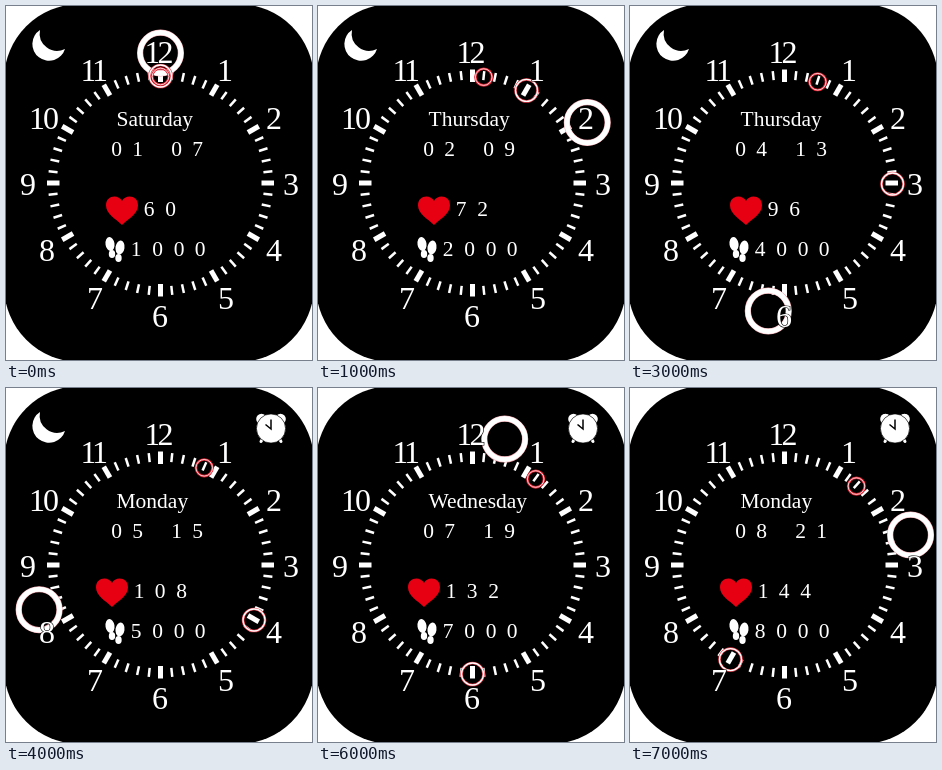
An HTML page for the animation above (8 s loop, 306 by 354 pixels).

```html
<!DOCTYPE html>
<html lang="en">
<head>
<meta charset="utf-8">
<title>Watch face</title>
<style>
html, body { margin: 0; width: 100%; height: 100%; overflow: hidden; background: #fff; }
svg { display: block; width: 306px; height: 354px; }
text { font-family: "Liberation Serif", serif; fill: #fff; }
#dial text { font-size: 32px; text-anchor: middle; stroke: #000; stroke-width: 1.2px; paint-order: stroke; }
.digits { font-size: 21.5px; text-anchor: middle; }
#day { font-size: 21.5px; }
circle.ring { fill: none; }
</style>
</head>
<body>
<svg viewBox="0 0 306 354" xmlns="http://www.w3.org/2000/svg">
  <rect x="-2" y="-2" width="310" height="358" rx="76"/>
  <path id="moon" fill="#fff" d="M34 24A16.7 16.7 0 1 0 59 43A17.5 17.5 0 0 1 34 24Z"/>
  <g id="alarm" fill="#fff">
    <path d="M256.500 51l-1.500 2.500M273.500 51l1.500 2.500" stroke="#fff" stroke-width="3" stroke-linecap="round"/>
    <circle cx="255.500" cy="31" r="5.3"/>
    <circle cx="274.500" cy="31" r="5.3"/>
    <circle cx="265" cy="40.500" r="14.6" stroke="#000" stroke-width=".7"/>
    <path d="M265 31.500V41L259.500 36.500" fill="none" stroke="#000" stroke-width="1.5"/>
  </g>
  <g id="ticks" stroke="#fff"></g>
  <text id="day" x="110.500" y="120"></text>
  <text id="date" class="digits" x="110.5 131.5 170.5 191.5" y="150"></text>
  <path id="heart" fill="#e60012" d="M0-9C-3-15.500-16-15.500-16-4.500C-16 4-6 9 0 15C6 9 16 4 16-4.500C16-15.500 3-15.500 0-9Z"/>
  <text id="pulse" class="digits" y="209.5"></text>
  <g fill="#fff">
    <ellipse cx="104" cy="238" rx="4.5" ry="7" transform="rotate(-8 104 238)"/>
    <ellipse cx="106" cy="248" rx="3.2" ry="4"/>
    <ellipse cx="114" cy="241.500" rx="4.5" ry="7" transform="rotate(8 114 241.500)"/>
    <ellipse cx="112.500" cy="252" rx="3.2" ry="4"/>
  </g>
  <text id="steps" class="digits" x="130 151.500 173 194" y="249.500"></text>
  <g id="rings"></g>
  <g id="dial"></g>
</svg>
<script>
const NS = "http://www.w3.org/2000/svg";
const $ = id => document.getElementById(id);
const CX = 154.5, CY = 177;

function add(parent, tag, attrs, text) {
  const el = document.createElementNS(NS, tag);
  for (const k in attrs) el.setAttribute(k, attrs[k]);
  if (text) el.textContent = text;
  return parent.appendChild(el);
}

function polar(deg, r, cy = CY) {
  const a = deg * Math.PI / 180;
  return [CX + r * Math.sin(a), cy - r * Math.cos(a)];
}

for (let i = 0; i < 60; i++) {
  const major = i % 5 === 0;
  const [x1, y1] = polar(i * 6, major ? 101 : 103.5);
  const [x2, y2] = polar(i * 6, major ? 113.5 : 112.5);
  add($("ticks"), "line", { x1, y1, x2, y2, "stroke-width": major ? 5 : 2.5 });
}

// label, baseline, centre of each digit
[
  ["12", 57, "146.5 159.5"], ["1", 75, 219], ["2", 123, 268], ["3", 188.5, 285],
  ["4", 254.5, 268], ["5", 303, 220], ["6", 321, 154], ["7", 303, 89],
  ["8", 255, 41], ["9", 188.5, 22], ["10", 122.5, "31 45"], ["11", 75, "82.5 94"]
].forEach(([label, y, x]) => add($("dial"), "text", { x, y }, label));

function ring(r, edge, outer, inner) {
  const g = add($("rings"), "g", {});
  add(g, "circle", { class: "ring", r, stroke: edge, "stroke-width": outer });
  add(g, "circle", { class: "ring", r, stroke: "#fff", "stroke-width": inner });
  return g;
}

// each hand is a ring that jumps along its own orbit
const hands = [
  { el: ring(20.4, "#f0a4ad", 6.2, 5.2), turn: 62.4, orbit: 129.5, cy: 176.5 },
  { el: ring(11, "#e43a48", 2.6, 1.3), turn: 30, orbit: 108, cy: 178 },
  { el: ring(8.3, "#e02030", 2.6, 0.8), turn: 6, orbit: 107.5, cy: 178 }
];

const COUNT = 8, STEP = 1000;
const weekday = new Intl.DateTimeFormat("en-US", { weekday: "long", timeZone: "UTC" });
const pad = n => String(n).padStart(2, "0");
let shown = -1;

function draw(n) {
  const month = n + 1, date = 7 + 2 * n, rate = 60 + 12 * n;
  const wide = rate > 99;
  $("day").textContent = weekday.format(Date.UTC(2023, n, date));
  $("date").textContent = pad(month) + pad(date);
  $("pulse").setAttribute("x", wide ? "133 154 175.5" : "143 164.5");
  $("pulse").textContent = rate;
  $("heart").setAttribute("transform", `translate(${wide ? 106 : 116} 204)`);
  $("steps").textContent = month * 1000;
  $("moon").style.display = n <= 4 ? "" : "none";
  $("alarm").style.display = n >= 4 ? "" : "none";
  for (const h of hands) {
    h.el.setAttribute("transform", `translate(${polar(n * h.turn, h.orbit, h.cy)})`);
  }
}

const start = performance.now();
function tick() {
  const n = Math.floor((performance.now() - start) / STEP) % COUNT;
  if (n !== shown) draw(shown = n);
  requestAnimationFrame(tick);
}
tick();
</script>
</body>
</html>
```
